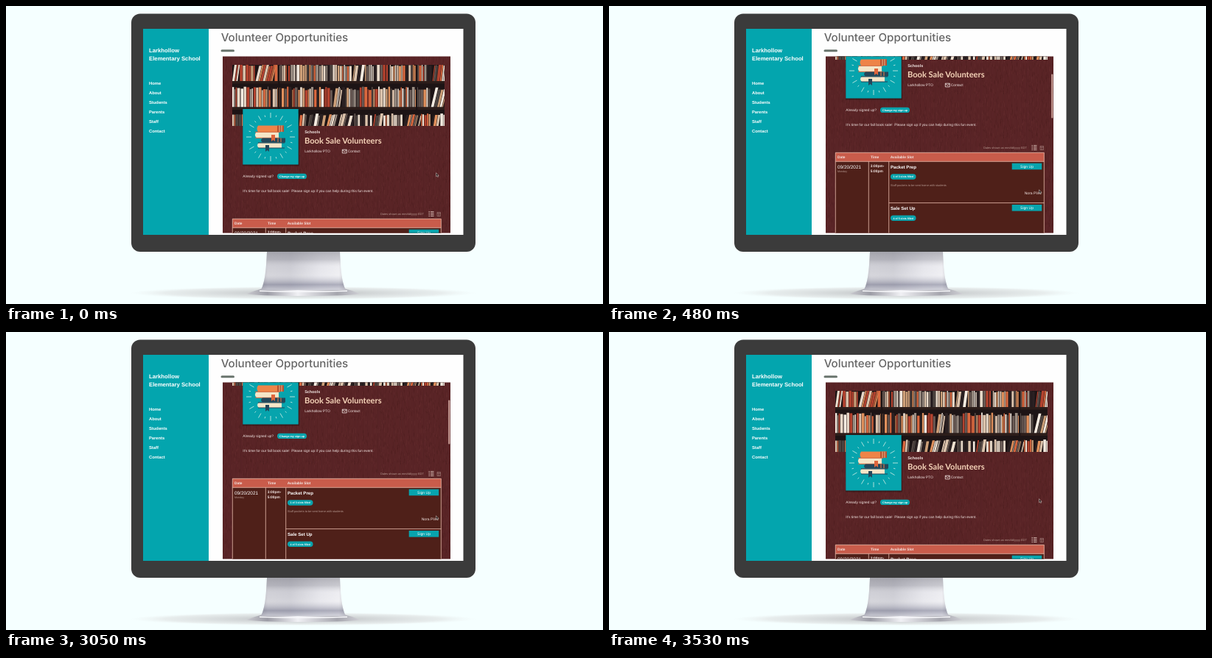
Write an HTML page that moves like this. It is 810 px wide and 405 px high and loops after 4.53 s.

```html
<!DOCTYPE html>
<html lang="en">
<head>
<meta charset="utf-8">
<title>Volunteer Opportunities</title>
<style>
  html, body { margin: 0; width: 100%; height: 100%; overflow: hidden; background: #f5ffff; }
  svg { display: block; width: 100vw; height: 100vh; }
  text { font-family: "Liberation Sans", Arial, sans-serif; text-rendering: geometricPrecision; white-space: pre; }
  .site { font-family: Inter, sans-serif; font-weight: 600; fill: #fff; }
  .title { font: 500 15.15px Inter, sans-serif; fill: #666; }
  .headline { font: 700 11.1px Lato, sans-serif; fill: #f5d3b8; }
  .body { font-size: 4.88px; fill: #f3e7e4; }
  .bold { font-weight: 700; }
  .slot { font-size: 6.1px; font-weight: 700; fill: #fff; }
  .fine { font-size: 3.93px; fill: #b79a92; }
  .pill { font-size: 3.5px; font-weight: 700; fill: #fff; text-anchor: middle; }
  .button { font-size: 5.05px; fill: #fff; text-anchor: middle; }
</style>
</head>
<body>
<svg viewBox="0 0 810 405" preserveAspectRatio="none">
  <defs>
    <clipPath id="panelClip"><rect x="294" y="68.5" width="309" height="240"/></clipPath>
    <clipPath id="bannerClip"><rect x="307" y="80" width="288" height="83"/></clipPath>
    <pattern id="linen" width="62" height="60" patternUnits="userSpaceOnUse">
      <rect width="62" height="60" fill="#5b2527"/>
    </pattern>
    <linearGradient id="neck">
      <stop offset="0" stop-color="#a3a3ac"/><stop offset=".08" stop-color="#c4c4cc"/>
      <stop offset=".35" stop-color="#c0c0c9"/><stop offset=".7" stop-color="#dfdfe6"/>
      <stop offset=".92" stop-color="#e9e9ee"/><stop offset="1" stop-color="#b4b4bc"/>
    </linearGradient>
    <linearGradient id="neckShade" x2="0" y2="1">
      <stop offset="0" stop-color="#85858d" stop-opacity=".55"/><stop offset=".22" stop-color="#9a9aa2" stop-opacity=".4"/>
      <stop offset=".4" stop-color="#fff" stop-opacity=".2"/><stop offset=".62" stop-color="#fff" stop-opacity=".3"/>
      <stop offset=".86" stop-color="#85869a" stop-opacity=".6"/><stop offset="1" stop-color="#c9cad4" stop-opacity=".6"/>
    </linearGradient>
    <linearGradient id="foot">
      <stop offset="0" stop-color="#c9c9cf"/><stop offset=".18" stop-color="#9c9ca5"/>
      <stop offset=".45" stop-color="#f0f0f4"/><stop offset=".8" stop-color="#a5a5ad"/><stop offset="1" stop-color="#cfcfd5"/>
    </linearGradient>
    <radialGradient id="ground">
      <stop offset="0" stop-color="#b9bcbe"/><stop offset=".4" stop-color="#d3d7d8"/>
      <stop offset=".8" stop-color="#e6ebeb" stop-opacity=".9"/><stop offset="1" stop-color="#eef5f5" stop-opacity="0"/>
    </radialGradient>
  </defs>

  <rect width="810" height="405" fill="#f5ffff"/>
  <ellipse cx="403" cy="390" rx="235" ry="9" fill="url(#ground)"/>
  <path d="M327 391Q338 386.5 348 384H459Q470 386.5 480 391Q470 394 403 394T327 391Z" fill="url(#foot)"/>
  <g id="stand">
    <path d="M354 333H453C454 360 456 376 461 386H346C351 376 353 360 354 333Z" fill="url(#neck)"/>
    <path d="M354 333H453C454 360 456 376 461 386H346C351 376 353 360 354 333Z" fill="url(#neckShade)"/>
  </g>
  <path d="M344 387.3Q403 389 463 387.3" fill="none" stroke="#f8f8fb" stroke-width="1.6"/>

  <rect x="170" y="10.5" width="467" height="323.5" rx="12" fill="#3b3b3b"/>
  <rect x="186" y="31" width="434.5" height="280" fill="#fefefe"/>
  <rect x="186" y="31" width="89" height="280" fill="#03a5ae"/>
  <g class="site" font-size="7.75">
    <text x="194" y="62.7">Larkhollow</text><text x="194" y="73.7">Elementary School</text>
  </g>
  <g class="site" id="menu" font-size="5.8"></g>
  <text class="title" x="291.7" y="47.8">Volunteer Opportunities</text>
  <rect x="291.5" y="59.3" width="18.5" height="3" rx="1.5" fill="#69746d"/>

  <g clip-path="url(#panelClip)">
    <rect x="294" y="68" width="309" height="241" fill="url(#linen)"/>
    <g id="page">
      <g id="banner" clip-path="url(#bannerClip)"><rect x="307" y="80" width="288" height="83" fill="#1d1415"/></g>

      <rect x="321" y="141.5" width="77" height="76" fill="#000" opacity=".3"/>
      <rect x="321.3" y="140" width="75.4" height="75.5" fill="#06a4ad"/>
      <g id="rays" stroke="#d8f0e6" stroke-width=".8"></g>
      <g>
        <path d="M342 162.5H377V171H342Q339 167 342 162.5Z" fill="#ee8448"/>
        <path d="M368 162.5H377V171H368Z" fill="#b8512f"/>
        <path d="M371 162.5V171M374 162.5V171" stroke="#f3d9ac" stroke-width=".8"/>
        <path d="M340 171.3H370V179.3H340Q335.5 175.3 340 171.3Z" fill="#f5e6c8"/>
        <path d="M338 171.3H372M338 179.3H372" stroke="#d9633a"/>
        <path d="M348 179.5H379V185.5H348Q344 182.5 348 179.5Z" fill="#24475a"/>
        <path d="M369 179.5V185.5M373 179.5V185.5" stroke="#ee8448"/>
        <path d="M360 175H365V184L362.5 182L360 184Z" fill="#e0663c"/>
        <path d="M343 185.8H374V193H343Q339 189.4 343 185.8Z" fill="#f5e6c8"/>
        <path d="M342 185.8H378M342 193H378" stroke="#24475a" stroke-width="1.2"/>
        <path d="M352 189H357V198L354.5 196L352 198Z" fill="#24475a"/>
      </g>

      <text class="body bold" x="405.2" y="173.2" style="font-size:5.4px">Schools</text>
      <text class="headline" x="405" y="187">Book Sale Volunteers</text>
      <text class="body" x="405.2" y="199.2">Larkhollow PTO</text>
      <path d="M456.3 195.2H462.2V199.9H456.3ZM456.3 195.6L459.25 198L462.2 195.6" fill="none" stroke="#f3e7e4" stroke-width=".8"/>
      <text class="body" x="463.8" y="199.2">Contact</text>
      <text class="body" x="321.3" y="233">Already signed up?</text>
      <rect x="368" y="227.8" width="40" height="7.2" rx="3.6" fill="#0aa3ac"/>
      <text class="pill" x="388" y="232.7" style="font-size:3.7px">Change my sign up</text>
      <text class="body" x="321.3" y="252.6">It's time for our fall book sale!  Please sign up if you can help during this fun event.</text>

      <text class="fine" x="508" y="284.2">Dates shown as mm/dd/yyyy EDT</text>
      <g fill="none" stroke="#c9aaa4">
        <path d="M573.5 279.5H575M573.5 281.5H575M573.5 283.5H575M573.5 285.5H575M576 279.5H580.5M576 281.5H580.5M576 283.5H580.5M576 285.5H580.5" stroke-width="1.2"/>
        <path d="M585 280.4H589.5V285.5H585ZM585 282H589.5M587.2 282V285.5" stroke-width=".7" opacity=".65"/>
      </g>

      <rect x="307" y="289" width="283.5" height="130" fill="#4f2019"/>
      <rect x="307" y="289" width="283.5" height="12.3" fill="#c95c4b"/>
      <path d="M307.3 419V289.3H590.3V419M307 301.3H590.5M352.3 301V419M379.7 301V419M379.7 357.6H590.5" fill="none" stroke="#d9ab9d" stroke-width=".9"/>
      <g class="body bold">
        <text x="310" y="297">Date</text><text x="355" y="297">Time</text><text x="381.7" y="297">Available Slot</text>
        <text x="354.7" y="309.2">3:00pm-</text><text x="354.7" y="315.8">5:00pm</text>
      </g>
      <text x="310" y="310.7" font-size="6.4" fill="#fff">09/20/2021</text>
      <text class="fine" x="310" y="316.4" style="font-size:3.65px">Monday</text>
      <g id="slots"></g>
      <text class="fine" x="382" y="334.6">Stuff packets to be sent home with students</text>
      <text class="body" x="586" y="346" text-anchor="end" style="font-size:5.1px">Nora Plint</text>
    </g>
    <rect id="scrollbar" x="600.3" width="2" height="60" rx="1" fill="#d3aaa1"/>
    <g id="saveBar">
      <rect x="294" y="290" width="309" height="19" fill="#cb5b4a"/>
      <rect x="419" y="291.8" width="59.5" height="14.6" fill="#08a4ad" stroke="#a4d5d2" stroke-width=".8"/>
      <text class="button" x="448.7" y="301.4" style="font-size:6.5px">Save &amp; Continue</text>
    </g>
    <path id="cursor" d="M0 0V5L1.3 3.9L2.2 5.7L3 5.3L2.2 3.6H3.7Z" fill="#17100f" stroke="#e8dcd9" stroke-width=".5"/>
  </g>
</svg>

<script>
const byId = id => document.getElementById(id);

function add(parent, tag, attrs, text) {
  const node = document.createElementNS("http://www.w3.org/2000/svg", tag);
  for (const key in attrs) node.setAttribute(key, attrs[key]);
  if (text) node.textContent = text;
  return parent.appendChild(node);
}

let seed = 11;
const random = () => (seed = seed * 16807 % 2147483647) / 2147483647;
const pick = list => list[Math.floor(random() * list.length)];

["Home", "About", "Students", "Parents", "Staff", "Contact"].forEach((name, i) =>
  add(byId("menu"), "text", { x: 194, y: 107.2 + i * 12.9 }, name));

// Woven look: faint columns crossed by short vertical threads
for (let x = 0; x < 62; x += 2) {
  add(byId("linen"), "rect", { x, y: 0, width: 1, height: 60, fill: "#47191c", opacity: 0.1 + random() * 0.25 });
}
for (let i = 0; i < 260; i++) {
  add(byId("linen"), "rect", {
    x: Math.floor(random() * 62), y: random() * 60, width: 1, height: 2 + random() * 5,
    fill: pick(["#421719", "#4a1c1c", "#703233"]), opacity: 0.25
  });
}

const spines = ["#efe0d0", "#f5ebe0", "#dcc3ac", "#d8683f", "#b4432f", "#4d4440",
  "#9a8d83", "#2a2022", "#cd9f78", "#e0905c", "#6a5b55", "#e7d8c8"];

// Books stand in runs; some runs lean against the next one.
function fillShelf(bottom, tallest, spread) {
  for (let x = 307; x < 595;) {
    const lean = random() < 0.3 ? 5 + random() * 9 : 0;
    const run = add(byId("banner"), "g", { transform: `translate(${x} ${bottom}) skewX(${-lean})` });
    const count = 3 + Math.floor(random() * 6);
    let offset = 0;
    for (let i = 0; i < count; i++) {
      const width = 1.6 + random() * 2.8, height = tallest - random() * spread;
      add(run, "rect", { x: offset, y: -height, width: width - 0.5, height, fill: pick(spines) });
      offset += width;
    }
    x += offset + (lean ? 2.5 : 0.5);
  }
  add(byId("banner"), "rect", { x: 307, y: bottom, width: 288, height: 3.5, fill: "#2c1d1a" });
}
fillShelf(102, 24, 4);
fillShelf(137.5, 28, 5);
fillShelf(166, 20, 3);
for (const x of [369, 556]) add(byId("banner"), "rect", { x, y: 80, width: 2.5, height: 61, fill: "#1d1415" });

for (let i = 0; i < 24; i++) {
  const angle = i * Math.PI / 12, inner = 26 + i % 2 * 2, outer = i % 2 ? 30.5 : 33;
  const cos = Math.cos(angle), sin = Math.sin(angle);
  add(byId("rays"), "line", {
    x1: 359 + cos * inner, y1: 178 + sin * inner, x2: 359 + cos * outer, y2: 178 + sin * outer
  });
}

function addSlot(top, name, filled) {
  const slots = byId("slots");
  add(slots, "text", { class: "slot", x: 382, y: top + 9.4 }, name);
  add(slots, "rect", { x: 382, y: top + 17, width: 34.5, height: 7.4, rx: 3.7, fill: "#0aa3ac" });
  add(slots, "text", { class: "pill", x: 399.2, y: top + 21.9 }, filled);
  add(slots, "rect", { x: 546.7, y: top + 2.4, width: 40.5, height: 8.6, fill: "#08a4ad" });
  return add(slots, "text", { class: "button", x: 567, y: top + 8.5 }, "Sign Up");
}
addSlot(301.3, "Packet Prep", "1 of 3 slots filled");
const choice = addSlot(357.6, "Sale Set Up", "4 of 5 slots filled");
const tick = add(byId("slots"), "path", {
  d: "M554.5 365.2L556 366.7L559.8 363.6", fill: "none", stroke: "#fff", "stroke-width": 1.1
});

const LOOP = 4530, STEP = 30, END = 780, BACK = 2780;
const clamp = v => Math.min(1, Math.max(0, v));
const show = (node, visible) => node.setAttribute("visibility", visible ? "visible" : "hidden");

function recordingTime(t) {
  const forward = Math.min(END, Math.floor(t / STEP) * STEP);
  return t < BACK ? forward : Math.max(0, END - STEP - Math.floor((t - BACK) / STEP) * STEP);
}

function scrollAt(t) {
  return t < 330 ? 80 * (t / 330) ** 1.06 : 90 - 10 * (1 - clamp((t - 330) / 90)) ** 2;
}

function draw(t) {
  const scroll = scrollAt(t), selected = t >= 600;
  byId("page").setAttribute("transform", `translate(0 ${-scroll})`);
  byId("scrollbar").setAttribute("y", 69 + scroll * 0.26);
  show(byId("scrollbar"), t > 0 && t < 540);

  const move = clamp((t - 420) / 120), eased = move * move * (3 - 2 * move);
  byId("cursor").setAttribute("transform", `translate(583.5 ${226.8 + eased * 46})`);
  show(byId("cursor"), t < 660);

  choice.textContent = selected ? "Selected" : "Sign Up";
  choice.setAttribute("x", selected ? 570.5 : 567);
  show(tick, selected);
  show(byId("saveBar"), t >= 630);
}

const start = performance.now();
function frame() {
  draw(recordingTime((performance.now() - start) % LOOP));
  requestAnimationFrame(frame);
}
frame();
</script>
</body>
</html>
```
